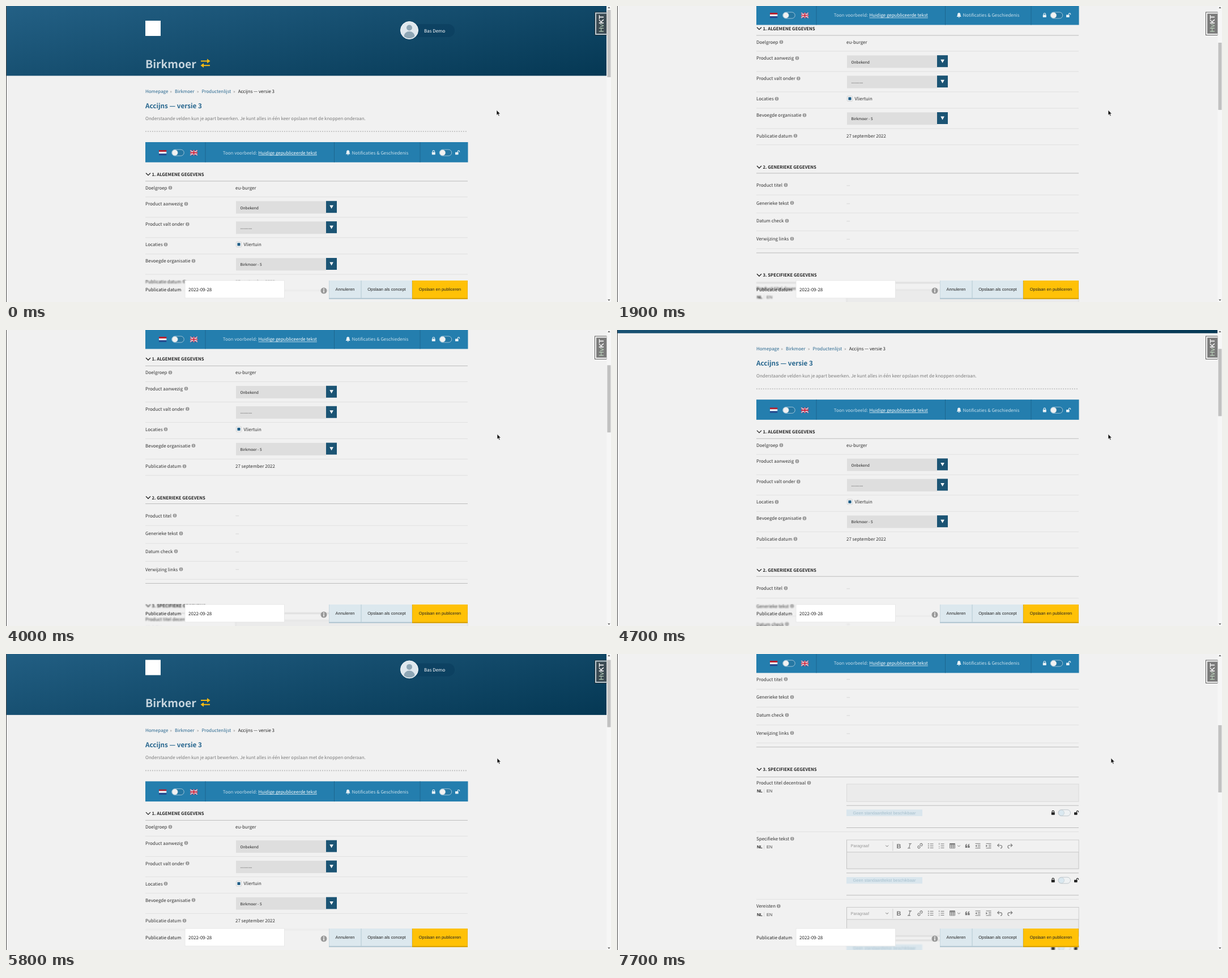
An HTML page that plays this animation: 1068 by 524 pixels, repeating every 8 s.

```html
<!DOCTYPE html>
<html lang="nl">
<head>
<meta charset="utf-8">
<title>Product bewerken</title>
<style>
html, body { margin: 0; width: 1068px; height: 524px; overflow: hidden; background: #f1f1f1; }
svg { position: absolute; left: 0; top: 0; }
text { font-family: "Noto Sans CJK JP", "Noto Sans CJK SC", "Noto Sans CJK", "Noto Sans", sans-serif; text-rendering: geometricPrecision; white-space: pre; }
.ui { font-family: "Liberation Sans", Arial, sans-serif; }
.mid { text-anchor: middle; }
.b { font-weight: 700; }
#blur { position: absolute; left: 245px; top: 485px; width: 571px; height: 39px; backdrop-filter: blur(1.3px); }
</style>
</head>
<body>
<svg id="page" width="1068" height="524"></svg>
<div id="blur"></div>
<svg id="top" width="1068" height="524"></svg>
<script>
const BODY = 7.95, LEFT = 246, RIGHT = 815, COL = 405;
const TOWN = 'Birkmoer', BLUE = '#28678f';

const rect = (x, y, w, h, fill, more = '') =>
  `<rect x="${x}" y="${y}" width="${w}" height="${h}" fill="${fill}" ${more}/>`;
const text = (x, y, str, fill = '#333', size = BODY, cls = '') =>
  `<text x="${x}" y="${y}" fill="${fill}" font-size="${size}" class="${cls}">${str}</text>`;
const path = (d, color, w = 1, more = '') =>
  `<path d="${d}" fill="none" stroke="${color}" stroke-width="${w}" ${more}/>`;
const shape = (d, fill, more = '') => `<path d="${d}" fill="${fill}" ${more}/>`;
const circle = (x, y, r, fill, more = '') =>
  `<circle cx="${x}" cy="${y}" r="${r}" fill="${fill}" ${more}/>`;
const at = (x, y, inner) => `<g transform="translate(${x} ${y})">${inner}</g>`;
const rule = (y, color = '#e0e0e0', x = LEFT) => rect(x, y - .5, RIGHT - x, 1, color);

const info = (x, y, r = 3.3) => circle(x, y, r, '#999') +
  rect(x - r * .16, y - r * .2, r * .32, r * .8, '#f1f1f1') + circle(x, y - r * .52, r * .2, '#f1f1f1');
const lock = (x, y, c) => rect(x - 3, y - 1, 6, 4.5, c, 'rx=".6"') +
  path(`M${x - 1.8} ${y - 1}v-1a1.8 1.8 0 0 1 3.6 0v1`, c, 1.1);
const unlock = (x, y, c) => rect(x - 4, y - 1, 5.6, 4.5, c, 'rx=".6"') +
  path(`M${x + .4} ${y - 1}v-1a1.6 1.6 0 0 1 3.2 0v1`, c, 1.1);
const toggle = (x, y, fill, edge, knob) =>
  rect(x, y - 5.5, 21.5, 11, fill, `rx="5.5" stroke="${edge}" stroke-width=".8"`) +
  circle(x + 5.5, y, 5, knob, `stroke="${edge}" stroke-width=".5"`);

function header() {
  return rect(0, 0, 1060, 123.5, 'url(#sky)') +
    rect(LEFT, 26, 27, 27, '#fff') +
    rect(700, 32, 92, 23, '#07395a', 'rx="11.5" opacity=".45"') +
    circle(712, 43, 15.5, '#dfe8ee', 'stroke="#f4f7f9"') +
    circle(712, 38.5, 5, '#8ea6b5') +
    shape('M702.5 53.5a9.5 8.5 0 0 1 19 0a14 14 0 0 1 -19 0z', '#8ea6b5') +
    text(738, 46.5, 'Bas Demo', '#fff') +
    text(LEFT, 109.5, TOWN, '#c6d5de', 19.4, 'b') +
    path('M344 97.5h12M360 105.2h-12', '#fdbc11', 2) +
    shape('M355 93.5l5.5 4l-5.5 4zM349 101.2l-5.5 4l5.5 4z', '#fdbc11');
}

function intro() {
  const crumbs = [[246, 'Homepage'], [298, TOWN], [345.5, 'Productenlijst']];
  return crumbs.map(([x, s]) => text(x, 154, s, BLUE)).join('') +
    [289.3, 336.7, 401].map(x => text(x, 153.7, '»', '#888', 7.5)).join('') +
    text(409.7, 154, 'Accijns — versie 3', '#222') +
    text(LEFT, 181, 'Accijns — versie 3', BLUE, 11.7, 'b') +
    text(LEFT, 201.7, 'Onderstaande velden kun je apart bewerken. Je kunt alles in één keer opslaan met de knoppen onderaan.', '#7b7b7b') +
    path(`M247 222H${RIGHT}`, '#bdbdbd', 2.1, 'stroke-dasharray="0 3.95" stroke-linecap="round"');
}

const heading = (y, str, lineY) => path(`M247 ${y - 2}l4 4l4 -4`, '#222', 1.3) +
  text(257.5, y + 3, str, '#222', 7.7, 'b') + rule(lineY, '#bcbcbc');
const label = (y, str, iconX) => text(LEFT, y + 2.8, str) + info(iconX, y - .3);
const select = (y, str) => rect(406, y, 159, 22, '#dedede') + rect(565, y - .3, 19, 21, '#1b5474') +
  shape(`M571.3 ${y + 7.3}h6.6l-3.3 6z`, '#fff') + text(413.5, y + 14, str, '#222', 6.7);

function general() {
  return heading(297.7, '1. ALGEMENE GEGEVENS', 310) +
    label(322, 'Doelgroep', 290) + text(COL, 324.8, 'eu-burger') +
    label(350.5, 'Product aanwezig', 318) + select(345.5, 'Onbekend') +
    label(386.5, 'Product valt onder', 320.3) + select(381.5, '---------') +
    label(422.5, 'Locaties', 282) +
    rect(406.5, 417.5, 9, 9, '#fff', 'stroke="#bbb" stroke-width=".7" rx="1"') +
    rect(408.4, 419.4, 5.2, 5.2, '#1f5d85') + text(419.5, 425, 'Vliertuin') +
    label(451.5, 'Bevoegde organisatie', 331) + select(446.3, TOWN + ' - 5') +
    label(488, 'Publicatie datum', 315) + text(COL, 490.8, '27 september 2022') +
    [338, 374, 410, 439, 475, 503.7].map(y => rule(y)).join('');
}

function generic() {
  const rows = [['Product titel', 298], ['Generieke tekst', 309], ['Datum check', 300], ['Verwijzing links', 309]];
  return heading(543, '2. GENERIEKE GEGEVENS', 554) +
    rows.map(([s, x], i) => label(575.2 + i * 31.7, s, x) +
      text(COL, 577.8 + i * 31.7, '—', '#b5b5b5', 7.2) + rule(592.6 + i * 31.7)).join('') +
    rule(695, '#bcbcbc');
}

function toolbar() {
  const c = '#777';
  const lines = (x, d) => path(`M${x} -3.5${d}M${x} 0${d}M${x} 3.5${d}`, c, 1);
  const indent = (x, tip) => path(`M${x - 4.5} -4h9M${x} -1.3h4.5M${x} 1.3h4.5M${x - 4.5} 4h9`, c, 1) +
    shape(`M${x - 3.2 - tip * 1.5} -2l${tip * 3} 2l${-tip * 3} 2z`, c);
  const undo = path('M-3.5 -1h5a2.6 2.6 0 0 1 0 5.2M-1 -3.7l-2.8 2.7l2.8 2.7', c, 1.1);
  const quote = x => shape(`M${x} 3.3v-3.5q0 -3 3 -3.2v1.2q-1.2 .3 -1.3 1.7h1.7v3.8z`, c);
  return text(412.5, 2.7, 'Paragraaf', '#999', 7.4, 'ui') +
    path('M474.3 -1l2.4 2.4l2.4 -2.4M601.2 -1l2.3 2.3l2.3 -2.3', c, 1) +
    rect(486.5, -8, .8, 17, '#c8c8c8') +
    text(497.5, 4, 'B', c, 11, 'ui b mid') +
    path('M515 -4h5M513 4h5M517.6 -4l-2.2 8', c, 1.1) +
    at(535, 0, `<g transform="rotate(-45)">${path('M-1 -2h-2a2 2 0 0 0 0 4h2M1 -2h2a2 2 0 0 1 0 4h-2M-2 0h4', c, 1.1)}</g>`) +
    lines(552.5, 'h6') + [-3.5, 0, 3.5].map(y => circle(549.8, y, .9, c)).join('') +
    lines(571.5, 'h6') + path('M568.8 -5v3M568 1h1.5M568 4h1.5', c, .9) +
    path('M587.5 -4h9v8h-9zM587.5 -1.3h9M587.5 1.3h9M590.5 -4v8M593.5 -4v8', c, .9) + rect(587.5, -4.5, 9, 2, c) +
    quote(614.8) + quote(619.2) + indent(637, -1) + indent(656, 1) +
    at(675.5, 0, undo) + at(694, 0, `<g transform="scale(-1 1)">${undo}</g>`);
}

// Origin is the top of the field
function field(y, name, iconX, rich) {
  const box = rich
    ? rect(405.5, .5, 409.5, 51, '#ebebeb', 'stroke="#c4c4c4"') + rect(406, 1, 408.5, 20.5, '#f1f1f1') +
      rect(COL, 21.5, 410, 1, '#c9c9c9') + at(0, 11, toolbar())
    : rect(405.5, .5, 409.5, 31, '#ebebeb', 'stroke="#dadada"');
  const end = rich ? 59 : 38.5;
  return at(0, y, label(-1.4, name, iconX) +
    text(247, 15.7, 'NL', '#222', 7.4, 'ui b') + rect(259.4, 9, .7, 8, '#ccc') +
    text(264, 15.7, 'EN', '#444', 7.4, 'ui') + box + rule(end, '#bcbcbc', COL) +
    at(0, end + 13, rect(COL, -5.8, 134, 11.6, '#dae6ed') +
      text(472, 2.6, 'Geen standaardtekst beschikbaar', '#a6bfcd', 7.42, 'ui mid') +
      lock(769.8, 0, '#222') + toggle(779, 0, '#eef1f3', '#b3bcc2', '#dae8f0') + unlock(811, 0, '#222')) +
    rule(end + 39.3, '#bcbcbc', COL) + rule(end + 46.5));
}

function specific() {
  return heading(734.3, '3. SPECIFIEKE GEGEVENS', 748) +
    field(760, 'Product titel decentraal', 339, false) +
    field(859, 'Specifieke tekst', 309.3, true) +
    field(978.2, 'Vereisten', 285.3, true);
}

function bar() {
  const flag = (x, inner) => `<svg x="${x}" y="14" width="13.5" height="9.6" viewBox="0 0 13.5 9.6">${inner}</svg>`;
  const cross = 'M6.75 0v9.6M0 4.8h13.5', diagonals = 'M0 0l13.5 9.6M13.5 0l-13.5 9.6';
  const sw = x => toggle(x, 18.7, '#2577a3', '#b9d4e3', '#f1f1f1');
  return rect(LEFT, 0, 569.5, 35.7, '#247eae') +
    [352, 579.5, 731].map(x => rect(x - .5, 0, 1, 35.7, '#1d6790')).join('') +
    flag(269.8, rect(0, 0, 14, 3.2, '#b5212f') + rect(0, 3.2, 14, 3.2, '#fff') + rect(0, 6.4, 14, 3.2, '#25488e')) +
    flag(324.8, rect(0, 0, 14, 10, '#20377a') + path(diagonals, '#fff', 2) + path(diagonals, '#c8203a', .7) +
      path(cross, '#fff', 3.2) + path(cross, '#c8203a', 1.9)) +
    sw(292.7) + sw(765.2) + lock(754.8, 18.7, '#e6f0f5') + unlock(797, 18.7, '#e6f0f5') +
    text(382.8, 21.6, 'Toon voorbeeld: ', '#c0dae8') +
    text(445.5, 21.6, 'Huidige gepubliceerde tekst', '#fff') + rect(445.5, 22.8, 103.3, .7, '#fff') +
    shape('M599.7 21.2q1.4 -1.2 1.4 -4q0 -2.6 2.6 -2.9q2.6 .3 2.6 2.9q0 2.8 1.4 4zM602.5 21.8h2.4a1.2 1.2 0 0 1 -2.4 0z', '#e6f0f5') +
    text(610.5, 21.6, 'Notificaties &amp; Geschiedenis', '#c9e0ec');
}

function footer() {
  const button = (x, w, str, fill, edge, ink) => rect(x, 486, w, 33, edge) + rect(x + .5, 486, w - 1, 30.8, fill) +
    text(x + w / 2, 504.2, str, ink, 7.45, 'ui mid');
  return text(LEFT, 504.7, 'Publicatie datum', '#222') +
    rect(316, 486, 175.5, 31, '#fff', 'stroke="#e2e2e2" stroke-width=".7"') +
    text(322, 504.8, '2022-09-28', '#222', 8.05) + info(561, 504, 5.5) +
    button(570, 57, 'Annuleren', '#dce8ee', '#b4c8d3', '#222') +
    button(627, 90, 'Opslaan als concept', '#dce8ee', '#b4c8d3', '#222') +
    button(717, 98, 'Opslaan en publiceren', '#ffc107', '#d9a200', '#222');
}

function chrome() {
  return `<g opacity=".72">${rect(1039.5, 11, 21, 40.5, '#fff', 'stroke="#222"')}${rect(1042, 13.5, 18, 35.5, '#4e4e4e')}</g>` +
    `<text transform="translate(1055.3 46.5) rotate(-90)" class="ui" font-size="12" fill="#c3dcc3">Hv<tspan class="b" fill="#f4f4f4">KT</tspan></text>` +
    rect(1060.3, 0, 8, 524, '#f6f6f6') + shape('M1062.2 4l2.2 -2.6l2.2 2.6zM1062.2 519.5l2.2 2.6l2.2 -2.6z', '#555') +
    rect(1061.4, 7, 6, 119, '#c1c1c1', 'id="thumb"') + rect(0, 0, 1, 524, '#4a4a4a') +
    shape('M0 0v9.2l2.1 -2l1.5 3.4l1.6 -.7l-1.5 -3.3h2.9z', '#111', 'id="cursor" stroke="#fff" stroke-width=".7"');
}

const $ = id => document.getElementById(id);
$('page').innerHTML = `<defs><linearGradient id="sky" gradientUnits="userSpaceOnUse" x1="503" y1="-89" x2="557" y2="212">
  <stop stop-color="#236085"/><stop offset="1" stop-color="#053854"/></linearGradient></defs>
  <g id="doc">${header() + intro() + general() + generic() + specific()}</g><g id="bar">${bar()}</g>`;
$('top').innerHTML = footer() + chrome();

// Scroll position over time: [ms, px]
const keys = [[0, 0], [600, 0], [1400, 236], [1500, 236], [1900, 258], [2400, 412], [3100, 412], [3200, 411],
  [4700, 117.8], [4800, 117.8], [5200, 0], [5500, 0], [5800, 15.6], [6100, 177], [6200, 177], [6500, 228.3],
  [7200, 412], [7300, 412], [7700, 530.3], [8000, 530.3]];
const slope = i => keys[i] && keys[i + 1] ? (keys[i + 1][1] - keys[i][1]) / (keys[i + 1][0] - keys[i][0]) : 0;
const tangent = i => {
  const a = slope(i - 1), b = slope(i);
  return a * b > 0 ? 2 * a * b / (a + b) : 0;
};
function scrollAt(t) {
  const i = keys.findIndex(k => k[0] > t) - 1;
  const [t0, p0] = keys[i], [t1, p1] = keys[i + 1], d = t1 - t0, u = (t - t0) / d, v = 1 - u;
  return p0 * v * v * (1 + 2 * u) + p1 * u * u * (3 - 2 * u) + d * u * v * (tangent(i) * v - tangent(i + 1) * u);
}

const move = (id, x, y) => $(id).setAttribute('transform', `translate(${x} ${y})`);
function draw() {
  const t = Math.floor(performance.now() % 8000 / 100) * 100; // ten pictures a second
  const s = scrollAt(t);
  move('doc', 0, -s);
  move('bar', 0, Math.max(241 - s, -2.2));
  move('thumb', 0, s * .2245);
  move('cursor', (t < 700 ? 866 : 867) + 5 * Math.min(1, Math.max(0, (t - 5800) / 300)), 184.3);
  requestAnimationFrame(draw);
}
draw();
</script>
</body>
</html>
```
